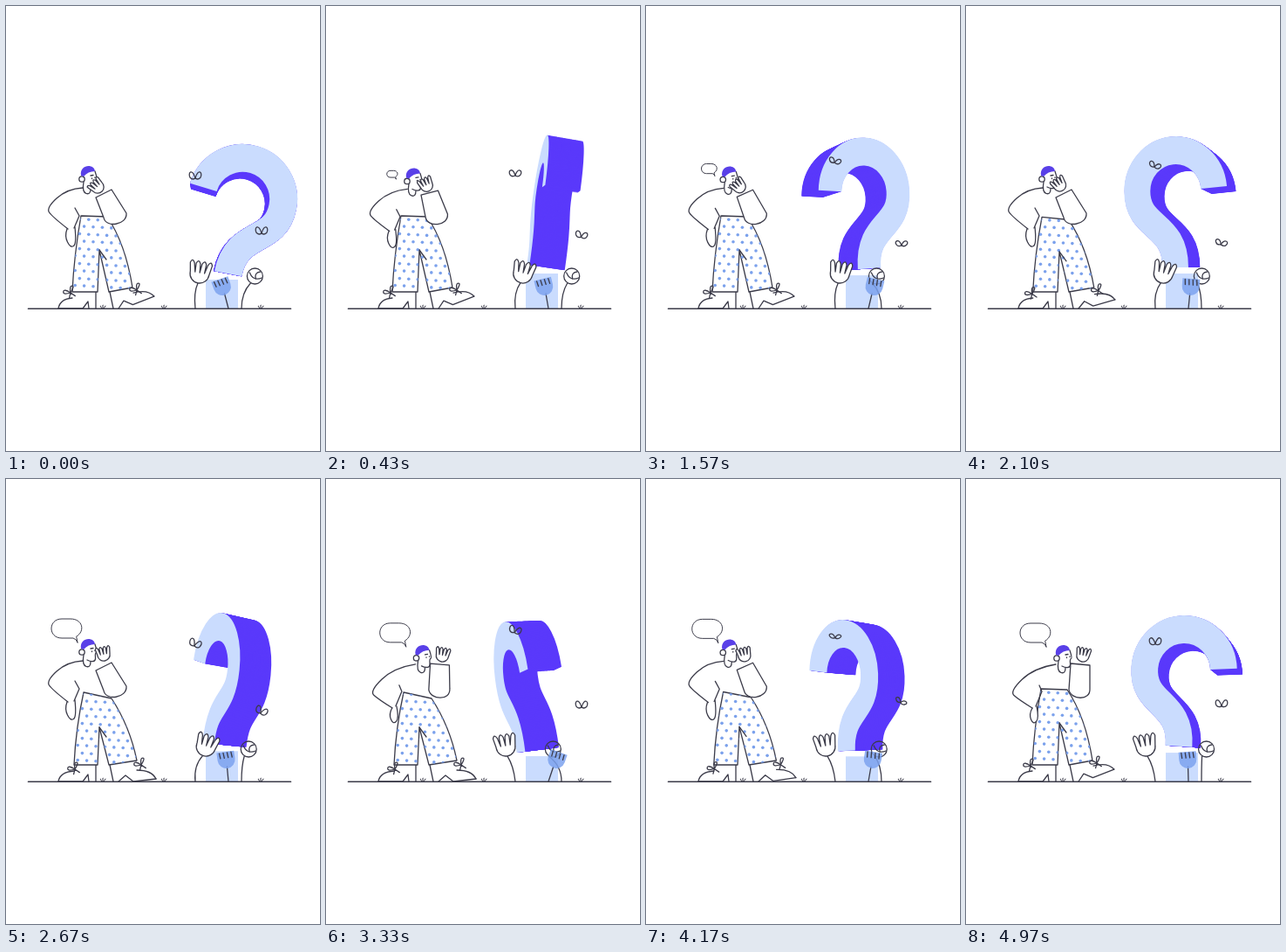
An HTML page with a canvas for the animation above (5 s loop, 360x509 px).

```html
<!DOCTYPE html>
<html lang="en">
<head>
<meta charset="utf-8">
<title>Thinking it over</title>
<style>
html, body { margin: 0; width: 100%; height: 100%; overflow: hidden; background: #fff; }
canvas { display: block; width: 360px; height: 509px; }
</style>
</head>
<body>
<canvas id="stage" width="360" height="509"></canvas>
<script>
const c = document.getElementById('stage').getContext('2d');
const { sin, cos, abs, PI } = Math;
const INK = '#3b3b49', PALE = '#cadcfe', PURPLE = '#5a39fb', BLUE = '#7da2ee';
// Lean of the question mark in degrees: [seconds, angle]
const LEAN = [[0, 11], [.87, 5], [1.57, -4], [2.75, 6], [3.33, -7], [4.17, -2], [5, 4]];

const mix = (a, b, k) => a.map((x, i) => x + (b[i] - x) * k);
const ease = u => { u = Math.min(Math.max(u, 0), 1); return u * u * (3 - 2 * u); };
// Rises from 0 after a, returns to 0 at b
const pulse = (t, a, b, d = .5) => ease((t - a) / d) * ease((b - t) / d);

function leanAt(t) {
  const i = LEAN.findIndex(p => p[0] > t);
  const [[t0, a], [t1, b]] = [LEAN[i - 1], LEAN[i]];
  return a + (b - a) * ease((t - t0) / (t1 - t0));
}

function at(x, y, turn, size, draw) {
  c.save();
  c.translate(x, y);
  c.rotate(turn);
  c.scale(size, size);
  draw();
  c.restore();
}

function ink(fill) {
  if (fill) { c.fillStyle = fill; c.fill(); }
  c.stroke();
}

function circle(x, y, r) {
  c.beginPath();
  c.arc(x, y, r, 0, 7);
}

function line(...p) {
  c.beginPath();
  for (let i = 0; i < p.length; i += 2) c.lineTo(p[i], p[i + 1]);
  c.stroke();
}

// Rounded line: inner points act as controls
function curve(p, fill) {
  const n = p.length;
  c.beginPath();
  c.moveTo(p[0], p[1]);
  for (let i = 2; i < n - 2; i += 2) {
    const k = i === n - 4 ? 1 : .5;
    c.quadraticCurveTo(p[i], p[i + 1],
      p[i] + (p[i + 2] - p[i]) * k, p[i + 1] + (p[i + 3] - p[i + 1]) * k);
  }
  ink(fill);
}

function hand(x, y, turn, size) {
  at(x, y, turn, size, () => {
    c.lineWidth = 1.3 / size;
    c.beginPath();
    c.arc(0, 0, 11, PI, 0, true);
    for (let i = 0; i < 4; i++) {
      const a = 11 - 5.5 * i, b = a - 5.5;
      c.lineTo(a * 1.25 - 1, -11);
      c.quadraticCurveTo((a + b) * .66, -17, b * 1.25 + 1, -11);
      c.lineTo(b, -1);
    }
    c.closePath();
    ink('#fff');
  });
}

function questionMark(t, lean) {
  const turn = (3 + 250 * t - 8 * (1 - cos(1.2 * PI * t))) * PI / 180;
  const face = cos(turn), side = sin(turn), front = face > 0;
  const x = 247 + .6 * lean;
  const y = 299 + (7 - 5 * sin(.4 * PI * t)) * (1 + cos(2.4 * PI * t)) / 2;
  const wide = (front ? 1 : -1) * Math.max(abs(face), .05);
  const depth = 41 * side * (front ? -1 : 1);

  c.fillStyle = PALE;
  c.fillRect(229, y + 7, 37, 339 - y);

  // k runs from 0 at the near face to 1 at the far one, which looks smaller
  const slice = (k, color) => at(depth * (k - .5), 0, 0, 1 - .07 * abs(face) * k, () => {
    c.scale(wide, 1);
    c.beginPath();
    c.arc(0, -87, 47, PI + .1, 0);
    c.bezierCurveTo(47, -43, 0, -52, 0, 0);
    c.lineWidth = 32;
    c.strokeStyle = color;
    c.stroke();
  });
  c.lineCap = 'butt';
  at(x, y, lean * PI / 180, 1, () => {
    for (let i = 44; i >= 0; i--) slice(i / 44, i ? PURPLE : PALE);
    if (!front && side < -.2) {
      c.translate(-depth / 2, 0);
      c.scale(wide, 1);
      c.lineWidth = 5;
      c.strokeStyle = '#fff';
      c.beginPath();
      c.moveTo(42, -97);
      c.quadraticCurveTo(39, -80, 28, -69);
      c.stroke();
    }
  });
  c.lineCap = 'round';
  c.strokeStyle = INK;
  c.lineWidth = 1.3;
}

// The hands sway with the mark they hold
function crowd(t, lean) {
  const away = ease((t - 2.7) / .6);
  const lx = 222 - 16 * away + 4 * (1 - away) * (1 - cos(1.2 * PI * t));
  const lt = (lx - 214) * .022;
  curve([217, 346, 215, 328, lx - 11 * sin(lt), 306 + 11 * cos(lt)]);
  hand(lx, 306, lt, 1);

  const fx = 270 + 1.4 * lean, fy = 309;
  curve([270, 346, 270, 328, fx - 5, fy + 8]);
  circle(fx, fy, 9);
  c.stroke();
  curve([fx - 6, fy - 4, fx - 2, fy + 6, fx + 8, fy + 2]);
  curve([fx + 1, fy + 3, fx - 1, fy - 4, fx + 6, fy - 5]);

  const bx = 258 - .95 * lean;
  line(bx + (255 - bx) * .4, 329, 255, 346);
  at(bx, 320, (bx - 256) * .04, 1, () => {
    c.beginPath();
    c.moveTo(-10, -8);
    c.lineTo(10, -8);
    c.arc(0, 1, 10, 0, PI);
    c.globalAlpha = .85;
    c.fillStyle = BLUE;
    c.fill();
    c.globalAlpha = 1;
    for (let x = -7; x < 8; x += 4.5) line(x, -7, x + .5, -1);
  });
}

function butterfly(x, y, turn, flap) {
  at(x, y, turn, 1, () => {
    for (const side of [-1, 1]) {
      c.beginPath();
      c.moveTo(0, 3);
      c.bezierCurveTo(side * 3, -6 * flap - 3, side * 9, -4 * flap, side * 6, 2);
      c.quadraticCurveTo(side * 4, 5, 0, 3);
      c.stroke();
    }
  });
}

function bow(x, y) {
  at(x, y, -.3, 1, () => {
    curve([0, 0, -6, -7, -9, 0, 0, 0]);
    curve([0, 0, 1, -8, 7, -6, 0, 0]);
    line(-3, 5, 0, 0, 4, 5);
  });
}

function legs(hip) {
  line(103, 327, 103, 346);
  curve([76 + 2 * hip, 334, 62, 335, 60, 346]);
  line(60, 346, 88, 346, 94, 338, 95, 346);
  line(119, 327, 123, 346);
  at(129, 346, -.26 * (1 - hip), 1, () => {
    curve([21, -13, 38, -13, 43, -3]);
    line(43, -3, 17, 0, 8, -7, 0, 0);
  });

  const right = 145 + 5 * hip, left = 76 + 2 * hip, top = 240 + 4 * hip, fork = 279 + 5 * hip;
  c.beginPath();
  c.moveTo(86 + 3 * hip, top);
  c.lineTo(116 + 5 * hip, top + 1 + 6 * hip);
  c.quadraticCurveTo(right - 8, 272 + 11 * hip, right, 322);
  c.lineTo(118, 327);
  c.lineTo(107, fork);
  c.lineTo(105, 327);
  c.lineTo(left, 327);
  c.quadraticCurveTo(left + 2, 285, 86 + 3 * hip, top);
  c.closePath();
  ink('#fff');
  c.save();
  c.clip();
  c.fillStyle = '#7ba1ec';
  for (let row = 0; row < 10; row++)
    for (let i = 0; i < 8; i++) {
      circle(74 + i * 10.4 + row % 2 * 5.2 + 3 * hip, 243 + row * 8.5 + i * .6 + 2 * hip, 1.8);
      c.fill();
    }
  c.restore();
  line(107, fork, 115, fork + 11);
  bow(left - 2 + 3 * hip, 328 + 4 * hip);
  bow(right + 5, 325 + 2 * hip);
}

function head(x, y) {
  at(x, y, 0, 1, () => {
    c.fillStyle = '#fff';
    c.fillRect(-6, 0, 14, 18);
    curve([8, 0, 11, 9, 8, 10, 9, 19, 3, 20, -1, 18]);
    curve([-5, 12, -7, 24, 3, 27, 3, 20]);
    circle(-7, 9, 3.2);
    ink('#fff');
    line(3, 5, 6, 4.5);
    line(4.5, 8, 4.5, 8.5);
    line(8, 7, 8, 7.5);
    c.beginPath();
    c.moveTo(-8, 5);
    c.bezierCurveTo(-10, -8, 7, -9, 8, 0);
    c.quadraticCurveTo(0, 0, -5, 6);
    c.fillStyle = '#5940e8';
    c.fill();
  });
}

function bubble(x, y, size) {
  at(x - 8, y + 14, 0, size, () => {
    c.translate(8, -14);
    c.lineWidth = 1 / size;
    c.beginPath();
    c.moveTo(0, 0);
    c.quadraticCurveTo(-1, -4, -5, -5);
    c.lineTo(-18, -5);
    c.bezierCurveTo(-34, -5, -34, -27, -18, -27);
    c.lineTo(-8, -27);
    c.bezierCurveTo(6, -27, 9, -13, -1, -7);
    c.closePath();
    ink('#fff');
  });
}

function person(t) {
  const look = pulse(t, .2, 1.65) + pulse(t, 2.85, 4.25) + pulse(t, 4.35, 6);
  const hip = pulse(t, 1.8, 4.75, .75);
  const talk = pulse(t, .2, 1.82) + pulse(t, 2.1, 6);
  const pose = (a, b) => mix(a, b, look);
  legs(hip);

  curve(pose([70, 255, 67, 263, 74, 277, 81, 272, 79, 253],
    [76, 262, 72, 269, 77, 281, 84, 274, 81, 260]), '#fff');
  curve(pose([88, 208, 70, 209, 46, 231, 53, 241, 71, 255],
    [103, 212, 78, 216, 50, 243, 60, 252, 76, 262]));
  line(...pose([79, 231, 84, 240, 78, 254], [84, 236, 87, 243, 80, 260]));

  head(94 + 17 * look, 189 + 7 * look);
  const raise = hip * (1 - look);
  hand(105 + 29 * look + 7 * raise, 207 - 5 * look - 6 * raise, look - .8 + .6 * raise, .65);

  const [ax, ay, bx, by, rx, ry, lx, ly] = pose(
    [103, 219, 121, 210, 138, 237, 112, 242], [120, 211, 142, 213, 142, 240, 118, 241]);
  c.beginPath();
  c.moveTo(ax, ay);
  c.lineTo(bx, by);
  c.lineTo(rx, ry);
  c.bezierCurveTo(rx + 1, ry + 14, lx + 2, ly + 12, lx, ly);
  c.closePath();
  ink('#fff');
  if (talk > .02) bubble(82 + 10 * look, 187 + 5 * look, talk);
}

function ground() {
  c.lineWidth = 1.6;
  line(25.5, 346.3, 326.5, 346.3);
  c.lineWidth = 1;
  for (const x of [111, 181, 292])
    for (const d of [-1, 0, 1]) line(x + 3 * d, 342 + abs(d), x + d, 346);
}

function draw(now) {
  const t = Math.floor(now % 5000 * .03) / 30, lean = leanAt(t);
  c.fillStyle = '#fff';
  c.fillRect(0, 0, 360, 509);
  c.strokeStyle = INK;
  c.lineWidth = 1.3;
  c.lineCap = c.lineJoin = 'round';

  questionMark(t, lean);
  crowd(t, lean);
  const flap = .55 + .45 * cos(6 * PI * t);
  butterfly(217, 181 + 1.2 * lean, .2 - .2 * cos(.4 * PI * t), flap);
  butterfly(293, 262 + 9 * cos(.4 * PI * (t - 1.7)), .25 - .25 * cos(1.2 * PI * t), flap);
  person(t);
  ground();
  requestAnimationFrame(draw);
}
requestAnimationFrame(draw);
</script>
</body>
</html>
```
